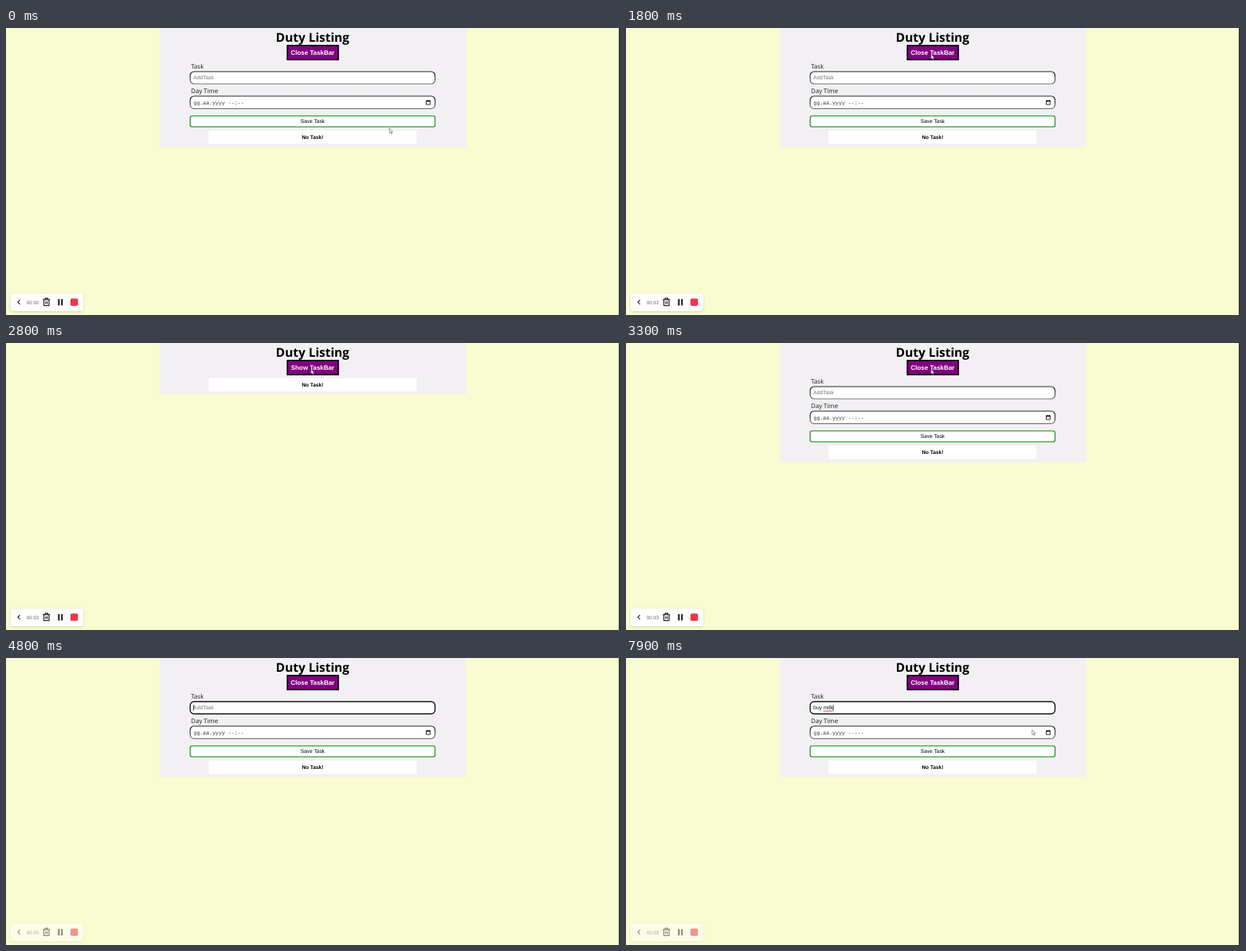
Recreate the animation shown at these times as an HTML page. Size 800 px wide and 375 px high, loop 8 s.

```html
<!DOCTYPE html>
<html lang="en">
<head>
<meta charset="utf-8">
<title>Duty Listing</title>
<style>
  html, body { margin: 0; width: 100%; height: 100%; overflow: hidden; background: #f9fbd1; }
  svg { display: block; width: 800px; height: 375px; }
  text { font: 7px "Liberation Sans", Arial, sans-serif; white-space: pre; text-rendering: geometricPrecision; }
  .mid { text-anchor: middle; }
  .bold { font-weight: 700; }
  .title { font: 700 16px "Open Sans", "Noto Sans", sans-serif; }
  .label { font: 8.1px "Open Sans", "Noto Sans", sans-serif; fill: #181818; }
  .toggle { font-size: 8.3px; fill: #fff; }
  .field { fill: #fff; stroke: url(#edge); stroke-width: 1.2; }
  .field.focused { stroke: #111; stroke-width: 1.4; }
  .date { font: 6.85px "Liberation Mono", monospace; fill: #333; }
  .icon { fill: none; stroke: #222; stroke-width: 1.2; }
</style>
</head>
<body>
<svg viewBox="0 0 800 375">
  <defs>
    <linearGradient id="edge" x1="0" y1="0" x2="0" y2="1">
      <stop offset=".3" stop-color="#222"/>
      <stop offset="1" stop-color="#767676"/>
    </linearGradient>
    <filter id="shadow" x="-10%" y="-30%" width="120%" height="160%">
      <feDropShadow dx="0" dy="1" stdDeviation="1.5" flood-opacity=".16"/>
    </filter>
  </defs>
  <rect width="800" height="375" fill="#f9fbd1"/>
  <rect x="798.6" width="1.4" height="375" fill="#111"/>

  <rect id="panel" x="200" width="399.5" height="155.5" fill="#f2f0f3"/>
  <text class="title mid" x="399.5" y="18">Duty Listing</text>
  <rect x="366.5" y="22.8" width="66.5" height="18.6" fill="#800080" stroke="#000" stroke-width="1.6"/>
  <text id="toggle" class="toggle bold mid" x="399.5" y="35"></text>

  <g id="form">
    <text class="label" x="241" y="53">Task</text>
    <rect id="taskField" class="field" x="240" y="57" width="319" height="16" rx="5"/>
    <text id="taskText" x="244" y="67.4"></text>
    <path id="spelling" d="M257.2 69.2H269.6" stroke="#d22" stroke-width=".9"/>
    <path id="caret" stroke="#000" stroke-width=".8"/>
    <text class="label" x="241" y="84.6">Day Time</text>
    <rect class="field" x="240" y="89" width="319" height="16.3" rx="5"/>
    <text class="date" x="244.3" y="99.6">gg.aa.yyyy --:--</text>
    <path d="M547.6 95H552.8V100H547.6ZM548.8 94V95M551.6 94V95" fill="none" stroke="#111" stroke-width=".9"/>
    <path d="M547.5 95.6H553" stroke="#111" stroke-width="1.3"/>
    <rect x="240" y="114.9" width="319" height="14.2" rx="2.5" fill="#fff" stroke="#329a32" stroke-width="1.4"/>
    <text class="mid" x="399.5" y="124.2" style="font-size:6.9px">Save Task</text>
  </g>

  <g id="empty">
    <rect x="264" width="271" height="17.5" fill="#fff"/>
    <text class="bold mid" x="399.5" y="11.3" style="font-size:6.8px">No Task!</text>
  </g>

  <g id="toolbar">
    <rect x="6" y="347" width="94.5" height="23" rx="4" fill="#fff" filter="url(#shadow)"/>
    <path class="icon" d="M18.3 355.4L15.5 358.3L18.3 361.2"/>
    <text id="timer" x="26.8" y="360.6" style="font-size:6.4px" fill="#666"></text>
    <path class="icon" d="M48 354.8H57.4M51 354.6V353.2H54.4V354.6M49.3 355V362.6H56.1V355M51.7 357.3V360.5M53.7 357.3V360.5"/>
    <path d="M67.7 354.2h2.2v8.2h-2.2zM71.7 354.2h2.2v8.2h-2.2z" fill="#222"/>
    <rect x="84" y="353.5" width="9.8" height="9.6" rx="1.8" fill="#ee3648"/>
  </g>

  <path id="pointer" d="M0 0V6.2L1.5 5L2.5 7.2L3.5 6.8L2.6 4.6H4.5Z" fill="#fff" stroke="#555" stroke-width=".6"/>
</svg>
<script>
const LOOP = 8000, STEP = 100;
const FOCUS = 4700;
const PHRASE = "buy milk";
const KEY_TIMES = [5200, 5400, 5700, 5900, 6200, 6400, 6600, 6800];

// Pointer legs: start time, end time, from, to
const LEGS = [
  [200, 1100, [499.6, 131], [398, 35.5]],
  [1100, 1300, [398, 35.5], [397.4, 34.3]],
  [3300, 3800, [397.4, 34.3], [440, 62]],
  [7600, 7900, [508, 68], [529, 94]]
];

const el = id => document.getElementById(id);
const clamp = v => Math.max(0, Math.min(1, v));
const smooth = v => v * v * (3 - 2 * v);
const show = (id, on) => el(id).setAttribute("visibility", on ? "visible" : "hidden");
const set = (id, name, value) => el(id).setAttribute(name, value);

function drawPointer(t) {
  const [start, end, from, to] = LEGS.filter(leg => t >= leg[0]).pop() || LEGS[0];
  const k = smooth(clamp((t - start) / (end - start)));
  const [x, y] = from.map((v, i) => v + (to[i] - v) * k);
  show("pointer", t < 3800 || t >= 7700);
  set("pointer", "transform", `translate(${x} ${y})`);
}

function drawTaskField(t) {
  const typed = KEY_TIMES.filter(time => t >= time).length;
  const focused = t >= FOCUS;
  el("taskText").textContent = typed ? PHRASE.slice(0, typed) : "AddTask";
  set("taskText", "fill", typed ? "#111" : "#757575");
  set("taskField", "class", focused ? "field focused" : "field");

  const lastInput = typed ? KEY_TIMES[typed - 1] : FOCUS;
  const caretX = 244.4 + (typed ? el("taskText").getComputedTextLength() : 0);
  set("caret", "d", `M${caretX} 61.2V68.6`);
  set("caret", "opacity", focused && (t - lastInput) % 1000 < 500 ? 1 : 0);
  set("spelling", "opacity", t >= 7300 ? 1 : 0);
}

function render(t) {
  const open = t < 2200 || t >= 3300;
  show("form", open);
  set("panel", "height", open ? 155.5 : 67);
  set("empty", "transform", `translate(0 ${open ? 134 : 46})`);
  el("toggle").textContent = open ? "Close TaskBar" : "Show TaskBar";
  el("timer").textContent = "00:0" + Math.floor((t + 200) / 1000);
  set("toolbar", "opacity", 1 - 0.48 * clamp((t - 3600) / 400));
  drawTaskField(t);
  drawPointer(t);
}

function tick() {
  const t = performance.now() % LOOP;
  render(Math.floor(t / STEP) * STEP);
  requestAnimationFrame(tick);
}
tick();
</script>
</body>
</html>
```
